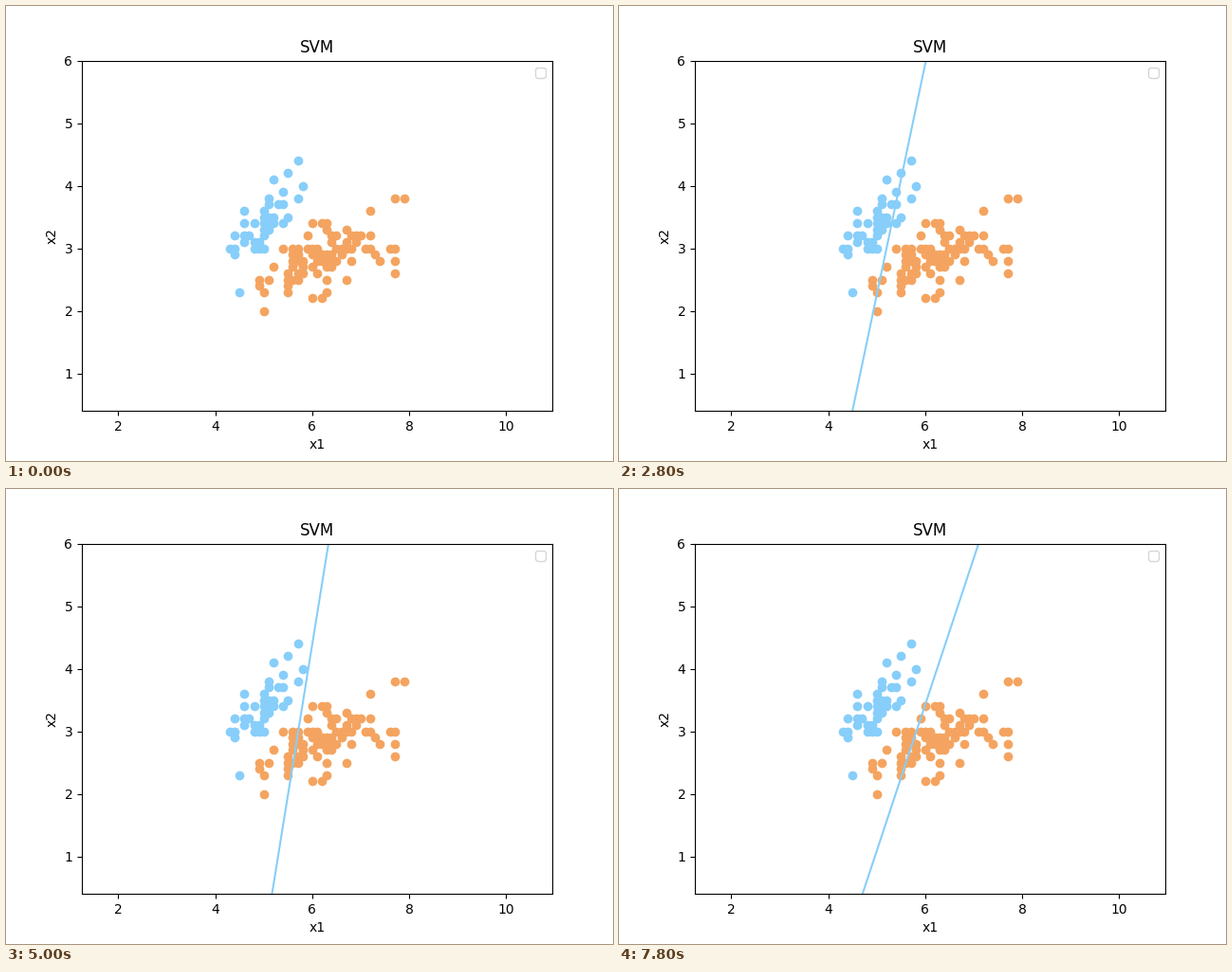
These frames come from a looping animation (640x480 px, 8000 ms). A matplotlib script:

```python
import matplotlib.pyplot as plt
import numpy as np
from matplotlib.animation import FuncAnimation

FRAMES, STEP = 40, 200
X_LIM, Y_LIM = (1.25, 10.95), (0.4, 6.0)
BLUE, ORANGE = "lightskyblue", "sandybrown"

# Iris sepal sizes in mm: length -> widths
setosa = {
    43: [30], 44: [29, 30, 32], 45: [23], 46: [31, 32, 34, 36], 47: [32],
    48: [30, 31, 34], 49: [30, 31], 50: [30, *range(32, 37)],
    51: [33, 34, 35, 37, 38], 52: [34, 35, 41], 53: [37],
    54: [34, 37, 39], 55: [35, 42], 57: [38, 44], 58: [40],
}
others = {
    49: [24, 25], 50: [20, 23], 51: [25], 52: [27], 54: [30],
    55: range(23, 27), 56: [25, *range(27, 31)], 57: [25, 26, 28, 29, 30],
    58: range(26, 29), 59: [30, 32], 60: [22, 27, 29, 30, 34],
    61: [26, 28, 29, 30], 62: [22, 28, 29, 34],
    63: [23, 25, 27, 28, 29, 33, 34], 64: [27, 28, 29, 31, 32],
    65: [28, 30, 32], 66: [29, 30], 67: [25, 30, 31, 33],
    68: [28, 30, 32], 69: [31, 32], 70: [32], 71: [30],
    72: [30, 32, 36], 73: [29], 74: [28], 76: [30],
    77: [26, 28, 30, 38], 79: [38],
}

# Boundary: time in ms, x at the bottom edge, x at the top edge
path = np.array([
    (1400, 4.31, 5.79), (2200, 4.43, 5.92), (2400, 4.39, 5.90),
    (3600, 4.715, 6.24), (3800, 4.68, 6.21), (4800, 5.10, 6.24),
    (5000, 5.17, 6.335), (6000, 4.90, 6.86), (7200, 4.78, 7.01),
    (7800, 4.706, 7.10),
])


def scatter(groups, color):
    points = [(x / 10, y / 10) for x, ys in groups.items() for y in ys]
    ax.scatter(*zip(*points), color=color)


def update(i):
    t = i * STEP
    low, high = (np.interp(t, path[:, 0], path[:, k]) for k in (1, 2))
    # Run past both edges so the axes clip the ends
    over = (high - low) / 10
    line.set_xdata([low - over, high + over])
    line.set_visible(t >= path[0, 0])
    return (line,)


fig, ax = plt.subplots(figsize=(6.4, 4.8), dpi=100)
scatter(setosa, BLUE)
scatter(others, ORANGE)
pad = (Y_LIM[1] - Y_LIM[0]) / 10
line, = ax.plot([0, 0], [Y_LIM[0] - pad, Y_LIM[1] + pad], color=BLUE)
ax.set(xlim=X_LIM, ylim=Y_LIM, title="SVM", xlabel="x1", ylabel="x2")
ax.legend(handles=[], loc="upper right")

anim = FuncAnimation(fig, update, frames=FRAMES, interval=STEP, repeat=True)
plt.show()
```
